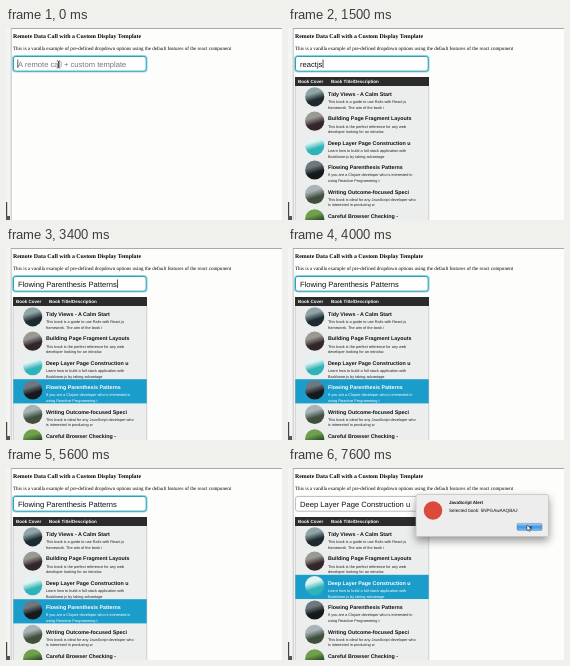
These frames come from a looping animation (276x192 px, 7700 ms). An HTML page:

```html
<!DOCTYPE html>
<html lang="en">
<head>
<meta charset="utf-8">
<title>Remote data dropdown</title>
<style>
html, body { margin: 0; width: 100%; height: 100%; overflow: hidden; background: #fff; }
svg { display: block; width: 100vw; height: 100vh; text-rendering: geometricPrecision; }
text { font-family: "Liberation Sans", Arial, sans-serif; fill: #111; white-space: pre; }
.serif { font-family: "Liberation Serif", Times, serif; fill: #000; }
.bold { font-weight: bold; }
.title { font: bold 5.35px "Liberation Sans", Arial, sans-serif; }
.desc { font-size: 3.85px; fill: #222; }
.on text { fill: #fff; }
.on .back { fill: #1b9dcb; }
.back { fill: #eceded; }
</style>
</head>
<body>
<svg viewBox="0 0 276 192" preserveAspectRatio="none">
  <defs>
    <linearGradient id="button" x2="0" y2="1">
      <stop stop-color="#a9d3f5"/><stop offset=".5" stop-color="#3f93e2"/><stop offset="1" stop-color="#74c0f6"/>
    </linearGradient>
    <filter id="shadow" x="-20%" y="-40%" width="140%" height="200%">
      <feDropShadow dx="0" dy="4" stdDeviation="4" flood-opacity=".42"/>
    </filter>
    <clipPath id="field"><rect x="8" y="29" width="131" height="14"/></clipPath>
  </defs>
  <rect width="276" height="192" fill="#fdfefc"/>
  <rect width="276" height="1" fill="#aaa"/>
  <rect width="5" height="192" fill="#f4f4f4"/>
  <rect x="4.8" width=".7" height="192" fill="#aaa"/>
  <rect y="174" width="1.2" height="18" fill="#444"/>
  <rect y="188" width="4" height="4" fill="#555"/>
  <text class="serif bold" x="7" y="9.6" font-size="5.9">Remote Data Call with a Custom Display Template</text>
  <text class="serif" x="7" y="21.5" font-size="5.06">This is a vanilla example of pre-defined dropdown options using the default features of the react component</text>

  <rect id="glow" x="6.6" y="27.6" width="134.4" height="16.4" rx="3" fill="none" stroke="#9bdbe8" stroke-width="1.2"/>
  <rect id="box" x="7.4" y="28.4" width="132.8" height="14.8" rx="2.4" fill="#fff"/>
  <g clip-path="url(#field)">
    <text id="value" x="12" y="38.6" font-size="7.6"></text>
    <rect id="caret" y="31.5" width=".7" height="8.5" fill="#111"/>
  </g>
  <path id="beam" d="M50.8 33h1.1l.6.5.6-.5h1.1M52.5 33.5v6M50.8 39.9h1.1l.6-.5.6.5h1.1" fill="none" stroke="#222" stroke-width=".8"/>

  <g id="list">
    <rect x="7" y="49" width="134" height="9" fill="#2b2b2b"/>
    <text class="bold" x="10" y="55" font-size="4.5" style="fill:#fff">Book Cover</text>
    <text class="bold" x="43" y="55" font-size="4.5" style="fill:#fff">Book Title/Description</text>
    <g id="rows"></g>
    <path d="M7.2 58V192M140.8 58V192" stroke="#bbb" stroke-width=".6"/>
  </g>

  <g id="alert">
    <rect x="128" y="26.5" width="132.5" height="42" rx="1.5" fill="#ededed" stroke="#aaa" stroke-width=".5" filter="url(#shadow)"/>
    <circle cx="145" cy="42.5" r="9.3" fill="#d94a3a"/>
    <text class="bold" x="161" y="36" font-size="4.5">JavaScript Alert</text>
    <text x="161" y="43.8" font-size="4.6">Selected book: 5NPGAwAAQBAJ</text>
    <rect x="229" y="55.4" width="25" height="7" rx="1.2" fill="url(#button)" stroke="#5686b5" stroke-width=".5"/>
    <text x="241.5" y="60.5" font-size="4.2" text-anchor="middle">OK</text>
  </g>
  <path id="pointer" d="M0 0v5.6l1.3-1.2.9 2.1 1-.4-.9-2.1h1.8z" fill="#fff" stroke="#222" stroke-width=".5"/>
</svg>
<script>
const LOOP = 7700, PITCH = 24.4, TOP = 58;
const QUERY = "reactjs", PLACEHOLDER = "A remote call + custom template";
const TYPE_START = 500, TYPE_STEP = 100, LIST_AT = 1300, ALERT_AT = 6300;

// title, description lines, cover tones from top to bottom
const books = [
  ["Tidy Views - A Calm Start", "This book is a guide to use Rails with React.js", "framework. The aim of the book i", "#8fa5a8", "#1d2a30"],
  ["Building Page Fragment Layouts", "This book is the perfect reference for any web", "developer looking for an introduc", "#9a9a94", "#33262a"],
  ["Deep Layer Page Construction u", "Learn how to build a full-stack application with", "Backbone.js by taking advantage", "#e2f3f2", "#2fb3b8"],
  ["Flowing Parenthesis Patterns", "If you are a Clojure developer who is interested in", "using Reactive Programming t", "#6f787f", "#15191c"],
  ["Writing Outcome-focused Speci", "This book is ideal for any JavaScript developer who", "is interested in producing w", "#a8b3b7", "#40503c"],
  ["Careful Browser Checking -", "", "", "#6fa04a", "#2a4b2a"]
];
// time of each key press and the row it selects
const keys = [[1900, 0], [2300, 1], [2700, 2], [3100, 3], [4300, 4], [5000, 3], [5700, 2]];

const $ = id => document.getElementById(id);
const show = (id, on) => $(id).style.display = on ? "" : "none";

$("rows").innerHTML = books.map(([title, a, b, light, dark], i) => `
  <g transform="translate(0 ${TOP + PITCH * i})">
    <linearGradient id="cover${i}" x2=".3" y2="1">
      <stop stop-color="${light}"/><stop offset=".4" stop-color="${light}"/><stop offset=".75" stop-color="${dark}"/>
    </linearGradient>
    <rect class="back" x="7" width="134" height="${PITCH + .1}"/>
    <circle cx="26.7" cy="10.8" r="9.6" fill="url(#cover${i})"/>
    <text class="title" x="40" y="10">${title}</text>
    <text class="desc" x="40" y="17.2">${a}</text>
    <text class="desc" x="40" y="22.8">${b}</text>
  </g>`).join("");
const rows = [...$("rows").children];

function draw(t) {
  const key = keys.findLast(k => t >= k[0]);
  const typed = Math.max(0, Math.min(QUERY.length, Math.floor((t - TYPE_START) / TYPE_STEP) + 1));
  const text = key ? books[key[1]][0] : QUERY.slice(0, typed);
  const lastInput = key ? key[0] : typed ? TYPE_START + (typed - 1) * TYPE_STEP : 0;
  const focused = t < ALERT_AT;

  const value = $("value");
  value.textContent = text || PLACEHOLDER;
  value.style.fill = text ? "#111" : "#777";
  $("caret").setAttribute("x", 12 + (text ? value.getComputedTextLength() + .3 : -.5));
  show("caret", focused && (t - lastInput) % 1060 < 530);
  show("beam", t < TYPE_START);
  show("glow", focused);
  $("box").setAttribute("stroke", focused ? "#1596b2" : "#bbb");

  show("list", t >= LIST_AT);
  rows.forEach((row, i) => row.classList.toggle("on", !!key && key[1] === i));

  show("alert", !focused);
  const p = Math.max(0, Math.min(1, (t - 6900) / 500)), ease = 1 - (1 - p) ** 2;
  show("pointer", p > 0);
  $("pointer").setAttribute("transform", `translate(${262 - 23 * ease} ${92 - 35 * ease})`);
}

function frame() {
  draw(performance.now() % LOOP);
  requestAnimationFrame(frame);
}
frame();
</script>
</body>
</html>
```
